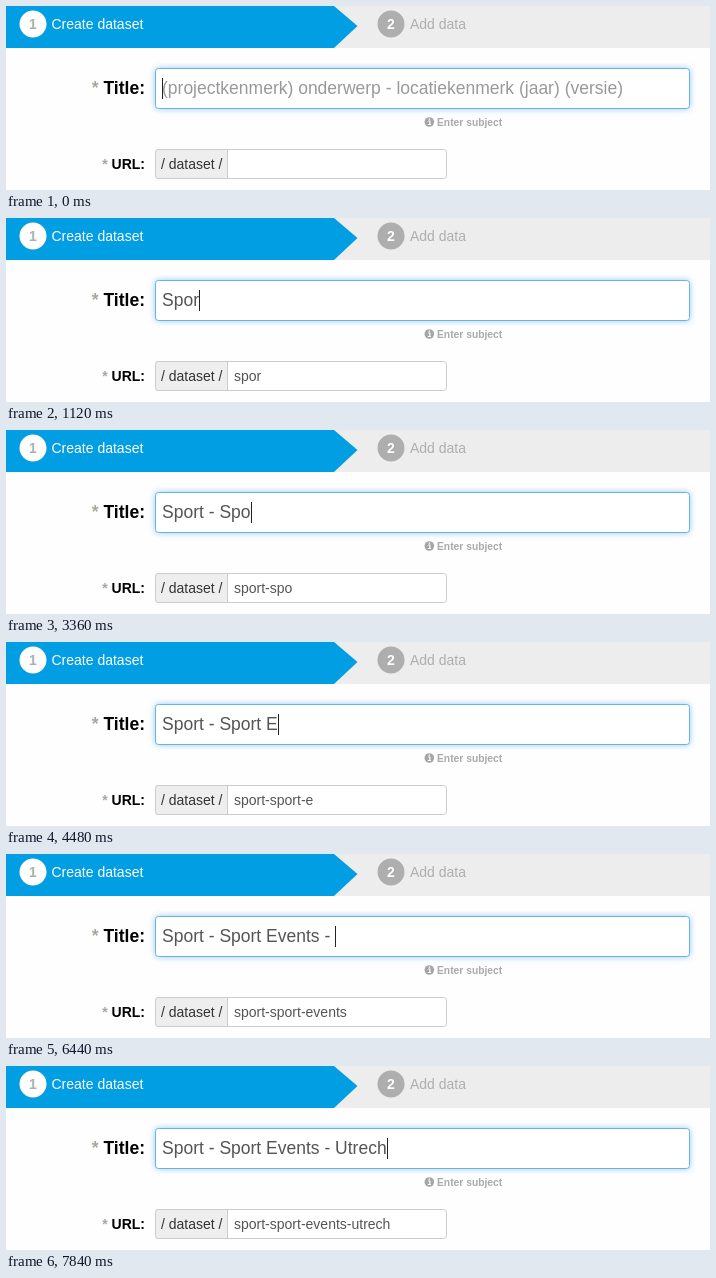
Write an HTML page that moves like this. It is 704 px wide and 184 px high and loops after 8 s.

```html
<!DOCTYPE html>
<html lang="en">
<head>
<meta charset="utf-8">
<title>Create dataset</title>
<style>
html, body { margin: 0; width: 100%; height: 100%; overflow: hidden; background: #fefefe; }
svg { display: block; width: 704px; height: 184px; font: 14px "Liberation Sans", Arial, sans-serif; }
text { white-space: pre; fill: #555; }
.b { font-weight: bold; }
.end { text-anchor: end; }
.mid { text-anchor: middle; }
.big { font-size: 17.5px; }
.box { fill: #fff; stroke: #ccc; }
.focus { stroke: #66b3e6; filter: drop-shadow(0 0 3px rgba(82, 168, 236, .6)); }
</style>
</head>
<body>
<svg viewBox="0 0 704 184">
  <rect width="704" height="42" fill="#ededed"/>
  <path d="M0 0H328L351.5 20L328 42H0Z" fill="#019ee3"/>
  <circle cx="27" cy="18" r="13.5" fill="#fff"/>
  <text class="b mid" x="27" y="23" style="fill:#a9b0b4">1</text>
  <text x="45.5" y="23" style="fill:#fff">Create dataset</text>
  <circle cx="385" cy="18" r="13.5" fill="#aeaeae"/>
  <text class="b mid" x="385" y="23" style="fill:#fff">2</text>
  <text x="404" y="23" style="fill:#aeaeae">Add data</text>

  <text class="b big end" x="139" y="88" style="fill:#000"><tspan fill="#aaa69c">* </tspan>Title:</text>
  <rect class="box focus" x="149.5" y="62.5" width="534" height="40" rx="3"/>
  <text class="big" id="hint" x="156" y="88" style="fill:#999">(projectkenmerk) onderwerp - locatiekenmerk (jaar) (versie)</text>
  <text class="big" id="title" x="156" y="88"></text>
  <rect id="caret" y="72" width="1" height="21" fill="#222"/>

  <circle cx="423.3" cy="116" r="4.8" fill="#a5a5a5"/>
  <path d="M422.2 115H423.8V118.5M421.8 118.5H425M422.7 113.2H424.1" fill="none" stroke="#fff" stroke-width="1.2"/>
  <text class="b" x="431" y="120" style="fill:#aaa;font-size:10.3px">Enter subject</text>

  <text class="b end" x="139" y="163" style="fill:#000"><tspan fill="#aaa69c">* </tspan>URL:</text>
  <rect class="box" x="149.5" y="143.5" width="291" height="29" rx="3"/>
  <path d="M221.5 144V172.5H152.5Q149.5 172.5 149.5 169.5V146.5Q149.5 143.5 152.5 143.5H221.5Z" fill="#eee" stroke="#ccc"/>
  <text x="155" y="163" style="fill:#333">/ dataset /</text>
  <text id="url" x="228" y="163"></text>
</svg>
<script>
const LOOP = 8000, TICK = 140, SLUG_LAG = 280;
const phrase = "Sport - Sport Events - Utrech";
// Tick at which each character of the phrase is typed.
const keys = [1, 6, 7, 8, 11, 14, 16, 18, 19, 22, 24, 25, 27, 30, 31,
  34, 35, 36, 38, 40, 44, 45, 46, 50, 51, 53, 54, 56, 56];
const [hint, title, url, caret] = ["hint", "title", "url", "caret"].map(id => document.getElementById(id));

const typed = t => phrase.slice(0, keys.filter(k => k * TICK <= t).length);
const slug = s => s.toLowerCase().replace(/[^a-z]+/g, "-").replace(/-$/, "");

function draw(now) {
  const t = now % LOOP;
  const text = typed(t);
  hint.style.display = text ? "none" : "";
  title.textContent = text;
  // The first letter reaches the address a little late.
  url.textContent = t < keys[0] * TICK + SLUG_LAG ? "" : slug(text);
  caret.setAttribute("x", Math.round(156 + (text ? title.getComputedTextLength() : 0)));
  requestAnimationFrame(draw);
}
draw(0);
</script>
</body>
</html>
```
